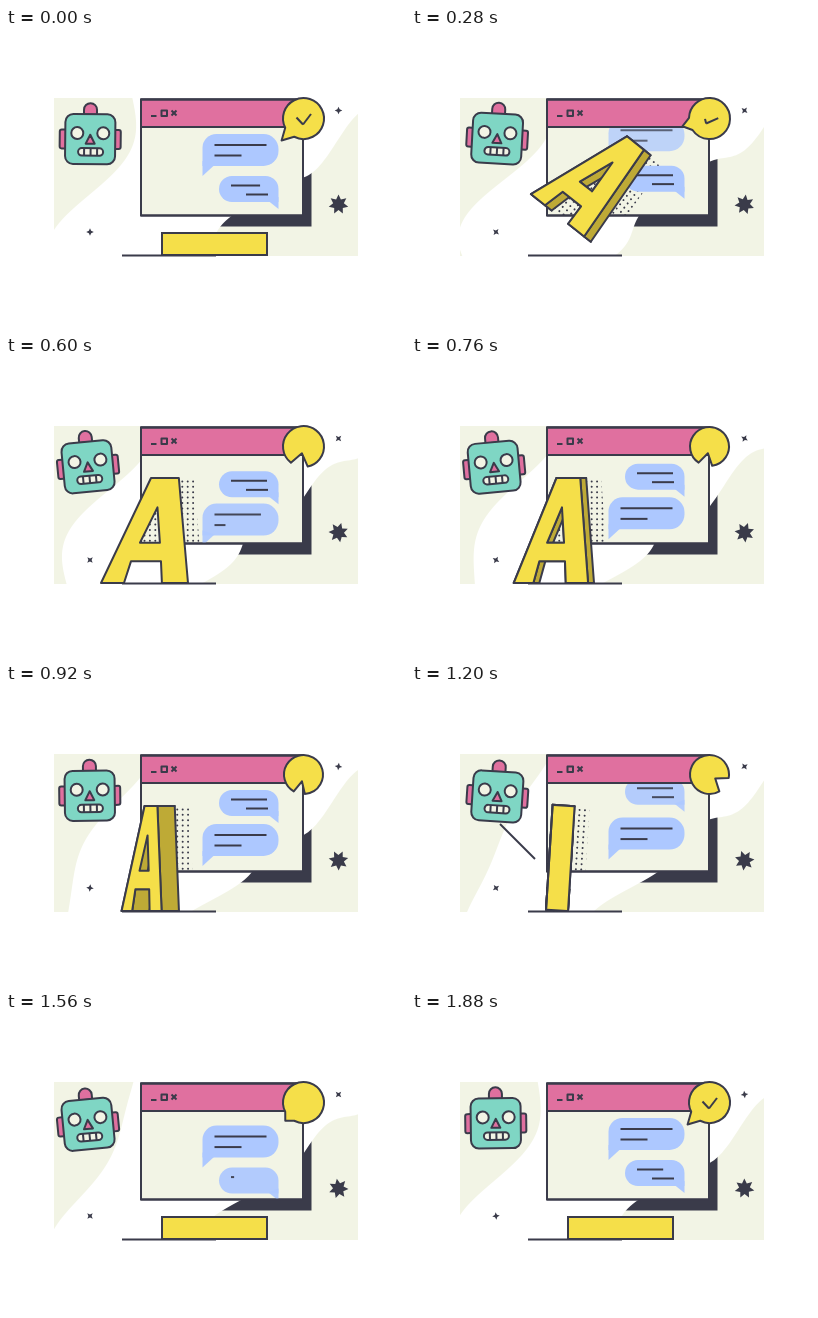
These frames come from a looping animation (400 px wide and 300 px high, 1920 ms). An HTML page with a canvas:

```html
<!DOCTYPE html>
<html>
<head>
<meta charset="utf-8">
<style>
html, body { margin: 0; width: 100%; height: 100%; overflow: hidden; background: #fff; }
canvas { display: block; }
</style>
</head>
<body>
<canvas id="stage" width="400" height="300"></canvas>
<script>
const c = document.getElementById('stage').getContext('2d');
const LOOP = 1920, HALF = LOOP / 2, STEP = 40;
const INK = '#3a3b4a', CREAM = '#f2f4e5', PINK = '#e0709f', TEAL = '#7fd6c4',
      YELLOW = '#f5df49', BLUE = '#adc8ff';

// The letter as [across, up] fractions of its width and height
const FACE = [[.264, 0], [0, 0], [0, 1], [.32, 1], [1, 0], [.7, 0], [.571, .206], [.226, .206]];
const HOLE = [[.235, .72], [.457, .383], [.228, .383]];

const { sin, cos, PI } = Math;
const rad = d => d * PI / 180;
const polar = (x, y, r, deg) => [x + r * cos(rad(deg)), y + r * sin(rad(deg))];
const mix = (a, b, k) => a + (b - a) * k;
const ramp = (t, a, b) => Math.max(0, Math.min(1, (t - a) / (b - a)));
const smooth = k => k * k * (3 - 2 * k);
const wave = turns => cos(2 * PI * turns);

function paint(fill, width = 2) {
  if (fill) { c.fillStyle = fill; c.fill('evenodd'); }
  if (width) { c.strokeStyle = INK; c.lineWidth = width; c.stroke(); }
}
function trace(pts, close = true) {
  pts.forEach((p, i) => i ? c.lineTo(...p) : c.moveTo(...p));
  if (close) c.closePath();
}
function poly(pts, fill, width) { c.beginPath(); trace(pts); paint(fill, width); }
function line(...pts) { c.beginPath(); trace(pts, false); paint(null); }
function box(x, y, w, h, r, fill, width) { c.beginPath(); c.roundRect(x, y, w, h, r); paint(fill, width); }
function disc(x, y, r, fill, width) { c.beginPath(); c.arc(x, y, r, 0, 7); paint(fill, width); }
function star(x, y, n, outer, inner, turn) {
  poly(Array.from({ length: 2 * n }, (_, i) => polar(x, y, i % 2 ? inner : outer, turn - 90 + i * 180 / n)), INK, 0);
}
function turned(x, y, deg, draw) {
  c.save();
  c.translate(x, y);
  c.rotate(rad(deg));
  draw();
  c.restore();
}
function clipped(x, y, w, h, draw) {
  c.save();
  c.beginPath();
  c.rect(x, y, w, h);
  c.clip();
  draw();
  c.restore();
}

// White band whose edges ripple over the cream ground and the window's shadow
function backdrop(t) {
  const k = t / LOOP, edge = [[354, 60]];
  c.fillStyle = CREAM;
  c.fillRect(48, 70, 304, 158);
  c.fillStyle = INK;
  c.fillRect(145, 80, 160.5, 118.5);
  for (let y = 60; y <= 230; y += 2) {
    const v = (y - 70) / 158;
    edge.push([94 + 42 * cos(PI * v) + 11 * wave(v - .42 + k), y]);
  }
  for (let y = 230; y >= 186; y -= 2)
    edge.push([236 - 1.1 * (y - 188) + 11 * wave(k - .55 + (y - 188) / 90), y]);
  for (let x = 290; x <= 354; x += 2)
    edge.push([x, 140 - .85 * (x - 300) + 10 * wave((x - 308) / 90 - 2 * k)]);
  clipped(47, 69, 306, 160, () => poly(edge, '#fff', 0));
}

const CHAT_A = { x: 196.5, w: 76, h: 32, rest: 140, left: true, round: [14, 15, 15, 0],
  rows: [{ x: 12, y: 11, w: 52, from: .5, to: .64 }, { x: 12, y: 21.5, w: 27, from: .56, to: .72 }] };
const CHAT_B = { x: 213, w: 59.5, h: 26, rest: 148, left: false, round: [13, 13, 0, 13],
  rows: [{ x: 12, y: 9.5, w: 36, from: .58, to: 1.1 }, { x: 27, y: 18.5, w: 22, from: .64, to: .95 }] };

// Age counts scroll steps: 0 enters, 1 moves up, 2 leaves under the title bar
function chat({ x, w, h, rest, left, round, rows }, age) {
  const stops = [rest + 34, rest, 106, 46], step = Math.floor(age);
  const y = mix(stops[step], stops[step + 1], smooth(ramp(age - step, 0, .9)));
  c.save();
  c.globalAlpha = ramp(age, .46, .64) * (1 - ramp(age, 2.22, 2.5));
  c.translate(x, y);
  box(0, 0, w, h, round, BLUE, 0);
  const edge = left ? 0 : w, inner = left ? 12 : w - 10;
  poly([[edge, h - 5], [edge, h + (left ? 10 : 7)], [inner, h - 1]], BLUE, 0);
  for (const r of rows) {
    const grown = r.w * ramp(age, r.from, r.to);
    if (grown) line([r.x, r.y], [r.x + grown, r.y]);
  }
  c.restore();
}

// The letter hops up while turning to face front, turns edge-on, then topples
function letterPose(t) {
  const rise = ramp(t, 0, 490), fall = ramp(t, 1140, 1440);
  const spin = 90 * (1 - rise + ramp(t, 600, 1060));
  const tilt = 90 * (1 - rise + fall * fall);
  const front = Math.max(0, cos(rad(spin))), side = sin(rad(spin)), hop = sin(PI * rise);
  const width = 87 * front, depth = 22 * side * side;
  const [px, py] = polar(0, 0, 11, tilt);
  return {
    tilt, width, depth,
    x: 138.5 + 6.5 * side + 11 - px + 4 * hop,
    y: 227 - py - 31 * hop,
    shade: Math.min(1, 4 * front),
    place: ([a, b]) => [a * width + b * 50 * front - (width + depth) / 2, -105 * b]
  };
}
function letterDots({ x, y, tilt, depth, place }) {
  const shifted = (p, d) => { const [u, v] = place(p); return [u + d, v]; };
  turned(x, y, tilt, () => {
    c.beginPath();
    trace([shifted(FACE[1], 15), shifted(FACE[2], 15), shifted(FACE[3], 15 + depth), shifted(FACE[4], 15 + depth)]);
    c.clip();
    for (let u = -81; u < 90; u += 5.4)
      for (let v = -107; v < 0; v += 5.4) disc(u, v, 1, INK, 0);
  });
}
function letter({ x, y, tilt, depth, shade, place }) {
  const face = FACE.map(place), hole = HOLE.map(place);
  const flank = `rgb(${mix(245, 190, shade)},${mix(223, 170, shade)},${mix(73, 54, shade)})`;
  const back = ([u, v]) => [u + depth, v];
  const wall = (a, b) => poly([a, b, back(b), back(a)], flank);
  turned(x, y, tilt, () => {
    if (depth > .5) {
      hole.forEach((p, i) => wall(p, hole[(i + 1) % 3]));
      // the long right flank goes last, over the inner walls
      for (const i of [1, 2, 0, 4, 5, 6, 7, 3]) wall(face[i], face[(i + 1) % 8]);
    }
    c.beginPath();
    trace(face);
    trace(hole);
    paint(YELLOW);
  });
}

function browser(t, pose) {
  box(135, 71.5, 162, 116, 0, CREAM);
  clipped(136, 99, 160, 88, () => {
    const p = t % HALF / HALF;
    const [outgoing, staying] = t < HALF ? [CHAT_A, CHAT_B] : [CHAT_B, CHAT_A];
    letterDots(pose);
    chat(outgoing, 2 + p);
    chat(staying, 1 + p);
    chat(outgoing, p);
  });
  box(135, 71.5, 162, 27.5, 0, PINK);
  box(135, 71.5, 162, 116, 0);
  line([145, 88], [150.5, 88]);
  box(155.5, 82.5, 5.5, 5.5, 0);
  line([165.5, 82.5], [170.5, 87.5]);
  line([170.5, 82.5], [165.5, 87.5]);
}

// A speech badge with a tick that becomes a chomping mouth and back
function badge(t) {
  const open = ramp(t, 440, 560) - ramp(t, 1300, 1420);
  const r = 20.5 - ramp(t, 600, 760) + ramp(t, 1300, 1460);
  const swing = 29 * ramp(t, 0, 280) * (1 - ramp(t, 440, 600));
  const tail = 10.5 * (1 - ramp(t, 200, 500) + ramp(t, 1480, 1640));
  const dir = open ? 103 - 68 * ramp(t, 940, 1200) : 135 + swing;
  const half = open ? open * (21 + 4 * wave((t - 600) / 640)) : 18;
  turned(297.5, 90.5, dir, () => {
    c.beginPath();
    c.arc(0, 0, r, rad(half), rad(360 - half));
    if (open) c.lineTo(mix(r, 7, open), 0);
    else if (tail > 1) c.lineTo(r + tail, 0);
    else c.arc(0, 0, r, rad(-half), rad(half));
    c.closePath();
    paint(YELLOW);
  });
  const short = 1 - ramp(t, 200, 360) + ramp(t, 1600, 1720);
  const long = 1 - ramp(t, 320, 440) + ramp(t, 1700, 1840);
  turned(297.5, 90.5, swing, () => {
    if (short) line([-.5 - 6.5 * short, 6 - 7 * short], [-.5, 6]);
    if (long) line([-.5, 6], [-.5 + 8 * long, 6 - 10.5 * long]);
  });
}

function robot(t) {
  const tilt = 5 * sin(2 * PI * (t + 50) / HALF) - 1;
  const drop = 1 + wave(t / LOOP - .7);
  turned(84, 131 + drop, tilt, () => {
    c.translate(-84, -131);
    c.beginPath();
    c.arc(84, 81, 6.5, PI, 0);
    c.lineTo(90.5, 86);
    c.lineTo(77.5, 86);
    c.closePath();
    paint(PINK);
    box(53.5, 101, 7, 19, 2, PINK);
    box(107.5, 101, 7, 19, 2, PINK);
    box(59, 85.5, 50, 50, 8, TEAL);
    disc(71, 104.5, 6, CREAM);
    disc(97, 104.5, 6, CREAM);
    poly([[84, 106], [79.5, 115], [88.5, 115]], PINK);
    box(72, 119.5, 25, 7.5, 3.7, CREAM);
    for (const x of [78, 84.5, 91]) line([x, 119.5], [x, 127]);
  });
}

function beam(t) {
  const head = 35 * ramp(t, 1120, 1200), end = 35 * ramp(t, 1200, 1280);
  if (head > end) line([88 + end, 140 + end], [88 + head, 140 + head]);
}

function draw(t) {
  const pose = letterPose(t), sway = 50 * sin(2 * PI * t / LOOP);
  c.fillStyle = '#fff';
  c.fillRect(0, 0, 400, 300);
  c.lineJoin = 'round';
  backdrop(t);
  browser(t, pose);
  badge(t);
  star(332.5, 82.5, 4, 3.8, 1.6, sway);
  star(84, 204, 4, 3.8, 1.6, sway);
  star(332.5, 176.5, 7, 10, 5.5, t / LOOP * 360 / 7);
  line([116, 227.5], [210, 227.5]);
  beam(t);
  letter(pose);
  robot(t);
}

const start = performance.now();
function tick() {
  const t = (performance.now() - start) % LOOP;
  draw(Math.floor(t / STEP) * STEP);
  requestAnimationFrame(tick);
}
tick();
</script>
</body>
</html>
```
